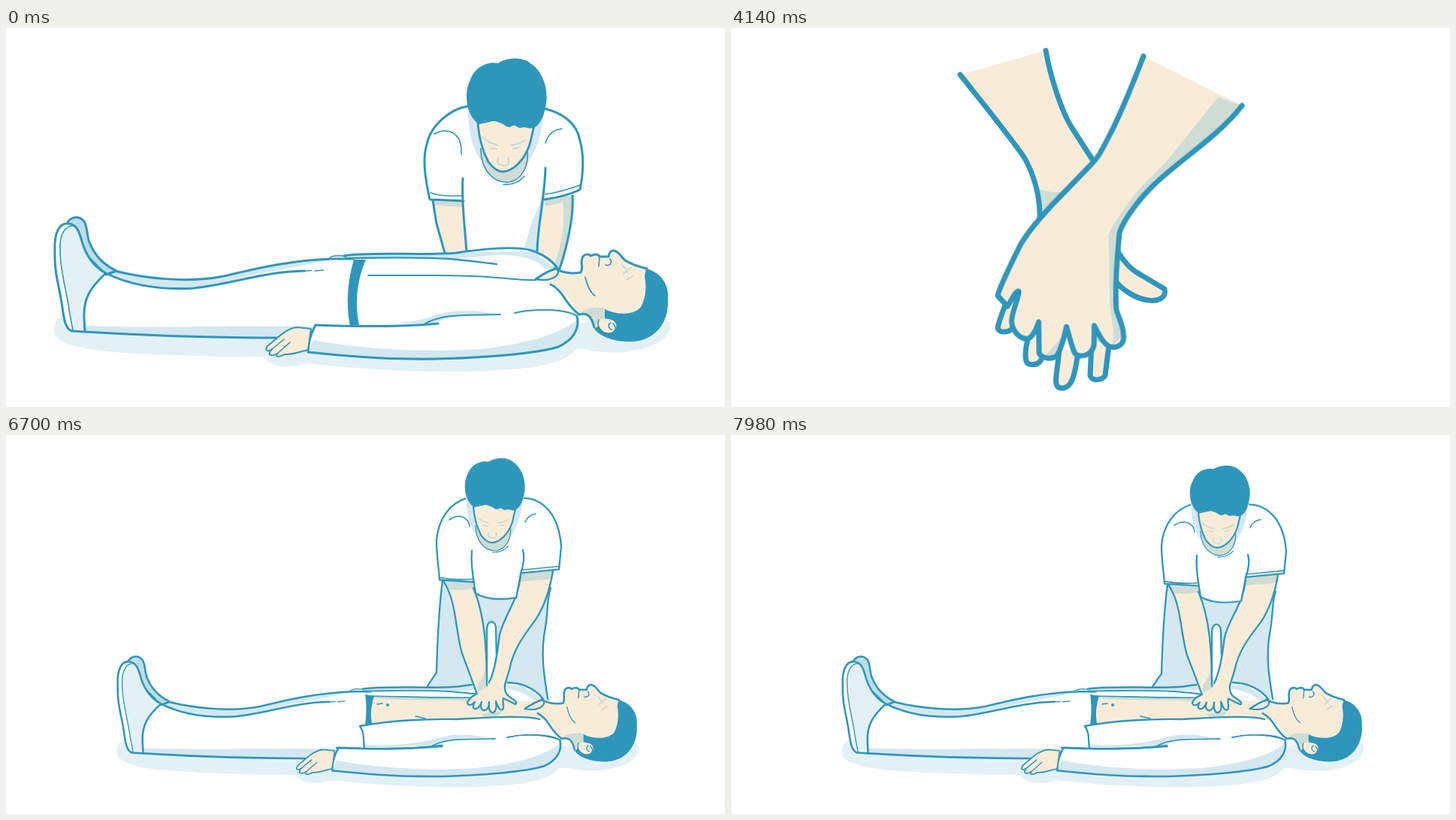
Animation, 957 px wide and 504 px high, one loop 8000 ms. Source, as an HTML page:

```html
<!DOCTYPE html>
<html lang="en">
<head>
<meta charset="utf-8">
<title>First aid steps</title>
<style>
html, body { margin: 0; width: 100%; height: 100%; overflow: hidden; background: #fff; }
svg { display: block; width: 100%; height: 100%; fill: none; stroke-linecap: round; stroke-linejoin: round; }
.o { stroke: #2f96bb; }
.thin { stroke-width: 1.6; }
.soft { stroke: #c9d9d6; stroke-width: 2; }
.w { fill: #fff; }
.s { fill: #f8ecd9; }
.b { fill: #2f96bb; }
.t { fill: #d3e8f0; }
.p { fill: #e3f1f6; }
.g { fill: #cfddd4; }

.scene { opacity: 0; animation: 8s step-end infinite; }
#arrive { animation-name: arrive; }
#place { animation-name: place; }
#lock { animation-name: lock; }
#press { animation-name: press; }
@keyframes arrive { 0% { opacity: 1 } 6.25%, 100% { opacity: 0 } }
@keyframes place { 0% { opacity: 0 } 6.25% { opacity: 1 } 42.25%, 100% { opacity: 0 } }
@keyframes lock { 0% { opacity: 0 } 42.25% { opacity: 1 } 78.25%, 100% { opacity: 0 } }
@keyframes press { 0% { opacity: 0 } 78.25%, 100% { opacity: 1 } }

.upper { transform-origin: 510px 240px; animation: lift 8s infinite; }
@keyframes lift {
  0%, 42.25% { transform: none; animation-timing-function: cubic-bezier(.28, .68, .6, 1); }
  58.25%, 100% { transform: translate(10.3px, -43.5px) rotate(.83deg); }
}
.tip { animation: peek 8s infinite; }
@keyframes peek {
  0%, 42.25% { transform: translate(14px, -16px); animation-timing-function: ease-out; }
  50%, 100% { transform: none; }
}
.bob { transform-origin: 0 370px; animation: bob 8s cubic-bezier(.37, 0, .63, 1) infinite; }
@keyframes bob {
  0%, 78.25%, 84.375%, 90.5%, 96.625% { transform: none; }
  81.3125%, 87.4375%, 93.5625%, 99.6875%, 100% { transform: scaleY(.968); }
}
</style>
</head>
<body>
<svg viewBox="0 0 957 504" preserveAspectRatio="none">
<defs>
  <g id="body" stroke-width="3">
    <path class="p" d="M64 405C62 385 75 378 100 380L760 395C800 380 880 370 884 395C884 420 840 434 800 431C775 430 768 424 757 428C745 448 690 456 600 457C520 458 440 450 400 446C385 452 350 453 345 438C330 437 300 438 220 435C140 432 70 428 64 405Z"/>
    <path class="w" d="M133 326L145 323C180 332 240 340 290 330C340 318 380 309 435 307L480 307L470 412L370 412C250 412 170 408 105 404C104 370 106 345 133 326Z"/>
    <path class="t" d="M133 326L145 323C180 332 240 340 290 330C340 318 380 309 435 307C390 318 345 324 315 332C240 353 180 348 133 326Z"/>
    <path class="t" d="M105 396C180 399 300 396 410 397L400 412H370C250 412 170 408 105 404Z"/>
    <path class="o" d="M145 323C180 332 240 340 290 330C340 318 380 309 435 307H478M133 326C160 340 200 349 250 346C300 341 340 324 398 323"/>
    <path class="o thin" d="M400 323L407 322.500M411 323L422 322"/>
    <path class="o" d="M105 404C170 408 250 412 370 412"/>
    <path class="o" style="fill:#bcdde8" d="M80 263C83 252 95 248 103 256C109 263 107 275 111 285C118 303 130 315 147 323L133 328L95 290Z"/>
    <path class="o p" d="M65 295C64 275 70 259 82 260C95 260 98 273 102 287C108 305 117 318 133 326C112 345 103 360 104 385L105 404L88 403C78 400 77 385 74 365C70 340 64 325 65 295Z"/>
    <path class="w" d="M67 295C66 275 72 262 87 263C76 264 72 280 72 295C72 325 81 350 84 375L89 401C80 398 79 385 76 365C72 340 66 325 67 295Z"/>
    <path class="o thin" d="M90 263C76 262 71 280 72 295C72 325 81 350 84 375L89 402"/>
    <path class="w" d="M450 303C480 297 560 303 600 299C640 293 680 290 700 296C720 303 730 312 736 323L705 335C728 342 745 365 762 382L700 430L410 412L458 397C452 365 455 335 465 308Z"/>
    <path class="t" d="M450 304C500 298 570 303 620 298L700 297L735 322L718 320C700 302 665 300 640 303C600 308 540 307 450 304Z"/>
    <path class="o p thin" d="M430 306C435 302 443 302 452 304"/>
    <path class="o" d="M450 303C480 297 560 303 600 299C640 293 680 290 700 296C720 303 730 312 736 323"/>
    <path class="o" stroke-width="2.300" d="M452 306C480 306 540 304 590 307C615 309 635 312 653 314"/>
    <path class="t" d="M480 395C535 393 555 388 575 381C600 372 630 376 657 381C620 381 595 382 570 392Z"/>
    <path class="w" d="M412 395L575 393C610 388 720 365 760 382C764 400 755 415 735 424C700 435 600 441 540 440C500 440 440 435 402 431Z"/>
    <path class="t" d="M402 431L409 415C470 427 560 432 630 427C680 422 735 410 760 388C764 400 755 415 735 424C700 435 600 441 540 440C500 440 440 435 402 431Z"/>
    <path class="o" d="M412 395C460 397 520 398 575 393M760 383C764 400 755 415 735 424C700 435 600 441 540 440C500 440 440 435 402 431C402 420 406 406 412 395"/>
    <path class="o" stroke-width="2" d="M558 393C580 381 600 382 658 381M677 379C700 373 745 373 760 383"/>
    <path class="o s" stroke-width="2" d="M406 400L388 398C375 399 367 407 348 423C343 430 349 431 354 427C347 434 352 438 361 433C358 438 364 438 371 434C381 435 392 430 402 428Z"/>
    <path class="o thin" d="M354 427L370 414M361 433L378 418"/>
  </g>

  <g id="lying-head" stroke-width="3">
    <path class="s" d="M705 334C715 327 727 322 735 322C745 326 755 327 765 325C769 318 764 313 767 306C769 300 776 300 778 303C784 300 789 301 790 304H802C803 298 805 296 809 296C816 297 819 305 824 309C835 316 845 318 853 320V370L805 400L783 395C778 381 774 379 765 381C750 367 745 344 720 338Z"/>
    <path class="g" d="M763 381C768 373 785 370 799 373L796 388L783 396C779 381 774 379 763 381Z"/>
    <path class="b" d="M852 320C870 324 883 340 881 360C883 395 860 418 830 417C805 417 790 409 783 400L797 390V374C815 383 837 381 845 371C853 357 852 340 850 330Z"/>
    <path class="s" d="M789 392C789 384 800 386 808 389C816 394 812 406 803 406C793 406 788 400 789 392Z"/>
    <path class="o thin" d="M789 388C785 399 795 407 804 406C812 404 813 398 808 393M805 392C801 394 801 399 806 401"/>
    <path class="o" d="M705 334C715 327 727 321 733 320M735 322C745 326 755 327 765 325C769 318 764 313 767 306C769 300 776 300 778 303C784 300 789 301 790 304H802C803 298 805 296 809 296C816 297 819 305 824 309C835 316 845 318 853 320M725 341C742 349 745 369 763 381C774 378 779 383 783 398"/>
    <path class="o" stroke-width="2.300" d="M705 334C716 336 727 336 734 328C736 324 735 320 730 319"/>
    <path class="o thin" d="M790 304L789 317M804 307C808 313 803 317 798 315M771 331C774 345 778 352 784 356"/>
    <path class="soft" d="M820 315L828 325M832 318L822 327M826 335L834 330"/>
  </g>

  <g id="bowed-head" stroke-width="2.800">
    <path class="t" d="M615 104C614 135 622 165 634 178L628 126ZM716 107C715 135 707 165 692 182L702 130Z"/>
    <path class="g" d="M632 160C632 190 650 207 670 205C688 201 696 182 694 160Z"/>
    <path class="o thin" d="M632 160C632 190 650 207 670 205C688 201 696 182 694 162M662 208C674 209 684 204 690 197"/>
    <path class="o s" d="M628 127C630 150 635 165 642 178C650 188 655 191 662 191C675 190 690 176 697 155L703 130L660 120Z"/>
    <path class="soft" d="M635 146C640 151 647 154 655 156M672 156C680 155 687 152 691 149M655 173C652 181 657 182 662 183C668 183 671 179 668 172M645 160L653 161M675 161L682 159"/>
    <path class="b" d="M628 127C612 115 609 85 618 69C625 49 645 44 655 47C668 38 690 39 698 47C716 58 723 85 718 105C715 122 709 130 702 133C696 135 690 130 685 133C680 133 678 128 674 130C670 133 667 132 662 128C652 123 640 120 628 127Z"/>
  </g>
</defs>

<g id="arrive" class="scene" stroke-width="3">
  <path class="w" d="M615 104H716C740 112 760 125 764 150C771 175 767 200 764 215L717 228L707 298H612L609 229L564 228C559 200 554 175 560 155C565 130 590 108 615 104Z"/>
  <path class="t" d="M718 190C715 230 708 240 700 258L688 298H708L718 228Z"/>
  <path class="s" d="M568 229L573 260L584 300H613L609 229ZM718 227C715 250 708 270 707 298L736 322C747 290 756 250 754 222Z"/>
  <path class="g" d="M568 229L609 230V238L570 236ZM717 228L754 222C757 250 747 290 736 322L730 315C740 285 745 260 741 232L718 237Z"/>
  <path class="o" d="M615 104C590 108 565 130 560 155C554 175 558 200 564 228L609 230M608 200C606 235 611 265 613 298M716 107C738 112 760 125 764 150C771 175 767 200 764 215C750 222 730 226 717 228M718 186C717 225 708 260 707 296M568 229L573 260L584 299M754 223C756 250 747 290 737 320"/>
  <path class="o thin" d="M565 219C580 224 595 224 608 223M718 221C735 219 750 214 764 209M570 141C586 131 608 138 606 168M718 153C722 140 730 135 740 134"/>
  <use href="#bowed-head"/>
  <use href="#body"/>
  <path class="b" d="M463 308H479C467 335 464 365 470 396L458 397C452 365 455 335 463 308Z"/>
  <path class="o" stroke-width="2" d="M482 329C540 329 600 328 640 331C670 333 690 336 705 335"/>
  <use href="#lying-head"/>
</g>

<g id="place" class="scene" stroke-width="4">
  <path class="s" d="M345 135C400 136 450 132 500 122C530 121 545 122 555 126C590 140 615 153 637 152C650 145 665 147 681 153C690 165 705 190 716 197L736 201C730 230 730 270 743 307C725 308 712 318 703 329C690 325 660 325 640 331C620 345 595 365 575 374L545 384C490 380 440 375 420 374C390 374 365 378 342 378C300 345 275 300 275 250C277 200 310 160 345 135Z"/>
  <path class="g" d="M345 137C390 138 420 135 455 131L462 140C420 144 380 148 350 146ZM525 123C560 122 590 143 637 152C600 155 565 133 530 131ZM303 330C320 325 338 330 330 345C350 360 385 352 410 353L459 376C420 372 380 378 342 378C325 362 310 345 303 330ZM449 195C470 200 485 225 490 262L463 271C467 245 460 215 449 195ZM279 238C290 246 305 250 322 252L312 262C300 257 290 254 278 254ZM493 340C498 355 510 365 530 373L526 381C505 375 490 360 493 340Z"/>
  <path class="b" d="M323 132C270 160 245 210 249 260C252 310 275 355 315 380H343C300 350 270 300 270 250C272 205 300 160 347 133Z"/>
  <path class="o" stroke-width="3" d="M346 137C300 170 276 210 276 255C277 305 310 350 341 377"/>
  <ellipse class="b" cx="328.500" cy="254" rx="7.500" ry="8.500"/>
  <path class="o" stroke-width="2" d="M278 254C295 250 310 255 320 258M371 330C395 328 395 345 459 375"/>
  <path class="o" d="M235 93C255 97 290 95 310 100C360 105 410 109 440 107M238 111C270 125 310 134 350 135C390 135 420 133 455 129M520 122C545 120 565 128 585 137C610 147 625 153 637 152C648 146 660 145 681 153C690 165 700 185 714 194C720 200 728 201 736 200"/>
  <path class="o" d="M510 43C560 42 640 62 655 88C662 105 665 128 677 128C690 125 695 110 701 103C720 125 735 155 728 178C725 188 720 192 714 194"/>
  <path class="o" stroke-width="3" d="M522 115C545 108 545 99 594 100M525 113C560 103 590 110 607 112"/>
  <path class="o" d="M242 382C290 378 340 378 370 378C410 372 430 374 455 377C500 380 545 386 575 381C600 379 612 380 615 378C630 370 636 362 642 357M550 382C590 372 625 340 640 332C655 322 672 330 680 331C690 328 697 320 703 329C710 320 715 312 727 307L744 308"/>
  <path class="o" d="M289 451C360 452 420 458 500 457C560 457 590 455 620 440C640 425 655 430 672 418C690 400 692 385 697 374C709 375 712 385 718 390C727 380 738 375 736 350C735 330 733 318 728 310"/>
  <path class="o" stroke-width="2.400" d="M654 178C653 195 654 212 657 225M673 162C677 190 670 238 693 234M662 280C661 292 664 305 662 318M679 318V278C690 272 697 272 703 270"/>
  <g stroke-width="5.500">
    <path class="s" d="M402 44L504 33C512 80 520 140 544 181C565 203 575 212 588 235C595 255 590 270 604 295C612 307 608 315 595 312C583 308 577 300 578 290L574 360L557 370L551 380H540L534 362L524 364L516 297L490 342L482 338L506 268V215C505 190 470 150 402 44Z"/>
    <path class="g" d="M402 44L432 41C450 90 505 165 514 195C521 230 520 260 507 266V215C505 190 470 150 402 44Z"/>
    <path class="o" d="M402 44C430 85 465 145 490 175C505 195 507 200 506 225V268C495 290 485 315 482 338C482 344 489 344 494 337C503 320 512 305 516 297C518 320 517 345 522 362C526 370 534 367 535 357M504 33C512 80 520 140 544 181C565 203 575 212 588 235C595 255 590 270 604 295C612 307 608 315 595 312C583 308 577 300 578 290C577 310 575 330 575 355C574 372 561 376 556 366M534 305L537 370C539 384 552 384 552 370V317L554 362"/>
    <path class="o" stroke-width="3.500" d="M579 251C581 265 580 278 577 290"/>
    <path class="o" stroke-width="2.300" d="M506 212C511 218 517 219 525 218M514 277L518 288M529 283L531 293M557 287L555 302"/>
  </g>
</g>

<g id="lock" class="scene" stroke-width="7">
  <path class="s" d="M305 62L419 30C425 65 440 110 452 130L500 205L518 295L480 400L400 400L420 272C411 265 411 255 411 245C409 220 403 195 392 175C380 155 335 100 305 62Z"/>
  <path class="g" d="M409 214C425 220 440 218 452 217L418 262C411 250 412 235 409 214Z"/>
  <path class="o" d="M419 30C425 65 440 110 452 130L492 192M305 62C335 100 380 155 392 175C405 200 411 225 411 250C411 262 413 268 420 272"/>
  <path class="o s" d="M508 282C518 308 533 322 545 328L577 347C580 358 570 364 555 362C540 360 522 350 508 333"/>
  <path class="o s tip" d="M366 365C362 378 356 390 355 399C357 407 372 405 376 397L380 380"/>
  <path class="o s" d="M400 400C391 420 389 446 397 447C410 450 415 442 417 426M437 425C435 460 426 479 441 479C456 478 458 455 462 432M480 420L478 462C480 470 494 469 498 462L503 422"/>
  <g class="upper">
    <path class="s" d="M538 75C525 110 505 160 492 185C482 205 478 212 470 220L420 273C400 295 380 320 374 335C362 360 350 385 348 396L361 410C366 403 372 388 376 390C377 395 366 420 367 430C368 445 380 453 388 453C396 450 400 440 403 430L404 472C408 479 420 480 428 475C435 462 438 445 440 436C445 450 447 465 453 473C465 478 475 470 477 460V434C485 450 490 458 498 462C510 464 518 458 516 445C515 432 508 420 506 412C504 385 506 345 509 310C515 290 540 260 550 250C580 218 640 180 670 139Z"/>
    <path class="g" d="M638 128L670 139C640 180 580 218 550 250C530 270 515 295 509 310C506 345 504 385 506 412L516 445L501 461C506 440 498 420 497 400L496 345L494 313C515 270 545 240 570 215ZM413 474L437 447L428 475ZM477 440L494 459L477 455Z"/>
    <path class="o" d="M538 75C525 110 505 160 492 185C482 205 478 212 470 220L420 273C400 295 380 320 374 335C362 360 350 385 348 396L361 410C366 403 372 388 376 390C377 395 366 420 367 430C368 445 380 453 388 453C396 450 400 440 403 430L404 472C408 479 420 480 428 475C435 462 438 445 440 436C445 450 447 465 453 473C465 478 475 470 477 460V434C485 450 490 458 498 462C510 464 518 458 516 445C515 432 508 420 506 412C504 385 506 345 509 310C515 290 540 260 550 250C580 218 640 180 670 139"/>
  </g>
</g>

<g id="press" class="scene" stroke-width="2.300">
  <g class="bob">
    <path class="o t" d="M581 193C575 240 574 280 573 316L570 320L560 335L722 356C716 320 711 290 718 255C722 230 720 215 725 203L690 185Z"/>
    <path class="o w" d="M640 340V258C641 245 650 245 652 255L654 340Z"/>
  </g>
  <use href="#body" transform="translate(93.600 81.200) scale(.847)"/>
  <path class="w" d="M462 343L482 345L478 385L471 390L477 417L455 410Z"/>
  <path class="s" d="M489 347L625 349L700 354L722 352L735 385L710 378C690 372 640 376 600 377C560 377 520 380 486 384Z"/>
  <path class="g" d="M489 347L627 349L620 354C580 351 530 354 489 350ZM632 371L660 367L654 376L640 377Z"/>
  <path class="b" d="M478 345L490 347C486 360 485 372 487 384L478 385C480 370 480 358 478 345Z"/>
  <circle class="b" cx="508" cy="359" r="2"/>
  <path class="o thin" d="M494 358L501 357M545 374L558 377M482 347C540 348 590 350 627 349"/>
  <path class="w" d="M471 387C510 380 560 377 600 378C640 376 690 372 710 378L715 395L650 403L580 411L477 417C475 405 478 397 471 387Z"/>
  <path class="t" d="M477 412C530 414 555 408 580 402C600 395 630 400 650 404C620 403 600 405 580 411L477 417Z"/>
  <path class="o" d="M477 417C475 405 478 397 471 387C510 380 560 377 600 378C640 376 690 372 710 378M440 416C490 418 540 418 580 413"/>
  <path class="o thin" d="M568 413C585 404 600 405 650 404M667 402C690 397 715 398 736 405"/>
  <use href="#lying-head" transform="translate(93.600 81.200) scale(.847)"/>
  <g class="bob">
    <path class="s" d="M583 195C600 235 598 280 627 346L643 345L665 340C672 290 690 270 705 245C718 225 724 205 728 180L685 183C682 220 670 235 660 260L643 330L640 320C640 290 638 240 622 196Z"/>
    <path class="g" d="M583 195L622 196L624 203C608 207 595 206 587 204ZM685 184L728 180L726 190C712 194 700 192 684 195ZM640 300V335L627 343L629 330C637 322 638 310 640 300Z"/>
    <path class="o" d="M583 195C600 222 598 260 607 290C615 312 621 327 627 345M622 203C638 240 640 290 640 333M685 186C682 220 665 235 657 265C654 290 651 312 643 329M728 180C724 205 718 225 705 245C690 265 675 285 670 312L664 332"/>
    <path class="o s" d="M627 344C618 348 612 355 615 358C618 361 622 357 624 355C620 361 622 365 626 364C630 362 632 358 633 355C630 363 634 367 638 366C642 364 643 359 643 355C642 364 644 370 649 369C653 367 653 360 652 354C655 362 657 367 661 365C664 362 660 354 662 350L678 358C682 356 676 352 670 348C666 345 663 340 664 332"/>
    <path class="w" d="M611 84H690C715 84 736 105 739 148L736 178L685 183L679 216C660 220 640 220 625 210L621 195L577 192C576 175 573 160 573 140C575 112 590 90 611 84Z"/>
    <path class="o" d="M613 83C590 90 575 112 573 140C573 160 576 175 577 192L622 195M620 153C618 175 623 195 625 210C640 219 660 219 679 216C682 200 684 192 685 183L736 178L739 148C736 105 715 84 690 83M688 152C691 163 688 175 685 183"/>
    <path class="o thin" d="M578 189C593 192 608 192 621 191M686 179L737 174M590 112C602 103 616 108 617 121M691 115C694 108 699 105 705 104"/>
    <use href="#bowed-head" transform="translate(151 -.75) scale(.75)"/>
  </g>
</g>
</svg>
</body>
</html>
```
